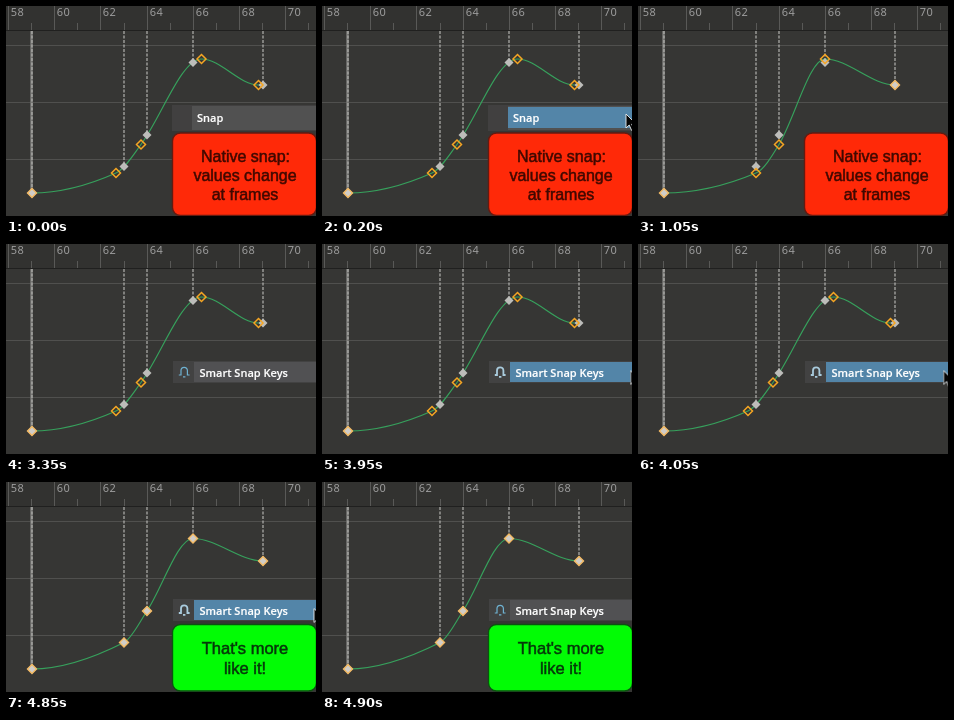
These frames come from a looping animation (310x210 px, 6800 ms). An HTML page:

```html
<!DOCTYPE html>
<html lang="en">
<head>
<meta charset="utf-8">
<title>Key snapping</title>
<style>
html, body { margin: 0; width: 100%; height: 100%; overflow: hidden; background: #363634; }
svg { display: block; width: 310px; height: 210px; }
.ruler text { font: 11px "Noto Sans", sans-serif; letter-spacing: .5px; fill: #9d9d9d; }
.menu text { font: 600 11px "Open Sans", sans-serif; fill: #fff; stroke: #fff; stroke-width: .2; }
.note text { font: 16px "Liberation Sans", Arial, sans-serif; text-anchor: middle; stroke-width: .5; }
.note.green text { font-size: 16.5px; }
.note rect { stroke-width: 1.4; }
.red text { fill: #400900; stroke: #400900; }
.green text { fill: #06380a; stroke: #06380a; }
.curve { fill: none; stroke: #36a15c; stroke-width: 1.15; }
.stem { stroke: #b3b3b0; stroke-width: 1.2; stroke-dasharray: 3 1.5; }
.grey { fill: #bdbdba; }
.orange { fill: none; stroke: #f6a623; stroke-width: 1.5; }
.both { fill: #d0cdc8; stroke: #f3b962; stroke-width: 1.4; }
.hot { fill: #5385a8; }
.icon { fill: none; stroke: #6fb2d2; stroke-width: 1.2; }
.toolHot .icon { stroke: #a9cbdd; stroke-width: 1.8; }

.loose, .native, .snap, .snapHot, .red, .tool, .toolHot, .green, .smart {
  animation: 6.8s step-end infinite; visibility: hidden;
}
.loose { animation-name: loose; }
.native { animation-name: native; }
.smart, .green { animation-name: smart; }
.snap { animation-name: snap; }
.snapHot { animation-name: snapHot; }
.red { animation-name: red; }
.tool { animation-name: tool; }
.toolHot { animation-name: toolHot; }
.toolCold { animation: toolCold 6.8s step-end infinite; }
@keyframes loose { 0%, 49.264% { visibility: visible } 15.441%, 65.441%, 100% { visibility: hidden } }
@keyframes native { 0%, 49.264%, 100% { visibility: hidden } 15.441% { visibility: visible } }
@keyframes smart { 0% { visibility: hidden } 65.441%, 100% { visibility: visible } }
@keyframes snap { 0% { visibility: visible } 15.441%, 100% { visibility: hidden } }
@keyframes snapHot { 0%, 15.441%, 100% { visibility: hidden } 2.205% { visibility: visible } }
@keyframes red { 0% { visibility: visible } 49.264%, 100% { visibility: hidden } }
@keyframes tool { 0% { visibility: hidden } 49.264%, 100% { visibility: visible } }
@keyframes toolHot { 0%, 72.058%, 100% { visibility: hidden } 58.088% { visibility: visible } }
@keyframes toolCold { 0%, 58.088% { visibility: hidden } 49.264%, 72.058%, 100% { visibility: visible } }

.pointer { fill: #050505; stroke: #e9eef0; stroke-width: .9; stroke-linejoin: round; }
.enter { animation: enter 6.8s step-end infinite; }
.edge { animation: edge 6.8s step-end infinite; }
@keyframes enter {
  0% { transform: translate(304px, 108px) }
  3.235% { transform: translate(286px, 108px) }
  4.264% { transform: translate(263px, 108px) }
  5.294% { transform: translate(239px, 108px) }
  6.323% { transform: translate(221px, 108px) }
  7.352%, 100% { transform: translate(214.5px, 108.5px) }
}
@keyframes edge {
  0% { transform: translate(308.5px, 126.5px) }
  58.823% { transform: translate(307px, 126.5px) }
  59.558% { transform: translate(305.5px, 126.5px) }
  71.323%, 100% { transform: translate(308px, 126.5px) }
}
</style>
</head>
<body>
<svg viewBox="0 0 310 210">
  <defs>
    <path id="key" d="M0-4.5 4.5 0 0 4.5-4.5 0Z"/>
    <path id="arrow" d="M0 0V14L3.2 11 5.6 16.4 8 15.3 5.7 10.2H10.2Z"/>
    <path id="magnet" d="M172.8 131H175V126.5A3.2 3.2 0 0 1 181.4 126.5V131H183.6M177 132.8H179.4"/>
  </defs>
  <rect width="310" height="210" fill="#363634"/>
  <path d="M0 39.5H310M0 96.5H310M0 153.5H310" stroke="#50504e"/>
  <g class="ruler">
    <rect width="310" height="24" fill="#323230"/>
    <path d="M0 24.5H310" stroke="#20201f"/>
    <g id="ruler"></g>
  </g>
  <g id="stems"></g>
  <g id="graph"></g>

  <g class="menu">
    <g class="snap">
      <path d="M166 99H310V125H166Z" fill="#414040"/>
      <path d="M186 100H310V124H186Z" fill="#515151"/>
    </g>
    <path class="snapHot hot" d="M186 101H310V122H186Z"/>
    <text class="snap" x="191" y="116">Snap</text>
    <g class="tool">
      <path d="M167 117H310V139H167Z" fill="#424242"/>
      <path d="M188 118H310V138H188Z" fill="#515153"/>
    </g>
    <use href="#magnet" class="icon toolCold"/>
    <g class="toolHot">
      <path class="hot" d="M188 118H310V138H188Z"/>
      <use href="#magnet" class="icon"/>
    </g>
    <text class="tool" x="193.5" y="133">Smart Snap Keys</text>
  </g>

  <g class="note red">
    <rect x="166.5" y="127" width="144" height="82.5" rx="8" fill="#ff2908" stroke="#641a10"/>
    <text x="239.5" y="155.5">Native snap:</text>
    <text x="239" y="175">values change</text>
    <text x="239" y="194">at frames</text>
  </g>
  <g class="note green">
    <rect x="166.5" y="142.5" width="144" height="66.5" rx="8" fill="#02fc05" stroke="#0c5110"/>
    <text x="239" y="171.5">That's more</text>
    <text x="239" y="191.5">like it!</text>
  </g>
  <g class="pointer">
    <g class="snapHot"><use href="#arrow" class="enter"/></g>
    <g class="toolHot"><use href="#arrow" class="edge"/></g>
  </g>
</svg>
<script>
const frameX = f => 2.5 + (f - 58) * 23.1;
const put = (id, html) => { document.getElementById(id).innerHTML = html; };
const keys = (points, kind) => points.map(([x, y]) =>
  `<use href="#key" class="${kind}" x="${x}" y="${y}"/>`).join('');

let ruler = '';
for (let f = 58; f <= 71; f++) {
  const x = Math.floor(frameX(f)) + .5, even = f % 2 === 0;
  ruler += `<path d="M${x} ${even ? 0 : 17}V24" stroke="#595957"/>`;
  if (even) ruler += `<text x="${x + 2.2}" y="10">${f}</text>`;
}
put('ruler', ruler);

const snapped = [[26, 187], [118, 160.5], [141, 129], [187, 56.5], [257, 79]];
put('stems', '<path d="M25.5 25V187" stroke="#777774" stroke-width="2.5"/>' +
  snapped.map(([x, y]) => `<path class="stem" d="M${x} 25V${y}"/>`).join(''));

// Auto-bezier tangent: flat at the ends and at peaks.
function slope(pts, i) {
  const a = pts[i - 1], b = pts[i], c = pts[i + 1];
  if (!a || !c || (b[1] - a[1]) * (c[1] - b[1]) <= 0) return 0;
  return (c[1] - a[1]) / (c[0] - a[0]);
}
function curve(pts) {
  let d = `M${pts[0]}`;
  for (let i = 1; i < pts.length; i++) {
    const [x0, y0] = pts[i - 1], [x1, y1] = pts[i], h = (x1 - x0) / 3;
    d += `C${x0 + h} ${y0 + h * slope(pts, i - 1)} ${x1 - h} ${y1 - h * slope(pts, i)} ${x1} ${y1}`;
  }
  return `<path class="curve" d="${d}H257"/>`;
}

const poses = {
  loose: [[26, 187], [110, 167], [135, 138.5], [195.5, 53], [252.5, 79]],
  native: [[26, 187], [118, 167], [141, 138.5], [187, 53], [257, 79]],
  smart: snapped
};
const onFrame = p => snapped.some(s => s[0] === p[0] && s[1] === p[1]);
put('graph', Object.entries(poses).map(([name, pts]) => `<g class="${name}">` + curve(pts) +
  keys(snapped, 'grey') + keys(pts.filter(p => !onFrame(p)), 'orange') +
  keys(pts.filter(onFrame), 'both') + '</g>').join(''));
</script>
</body>
</html>
```
